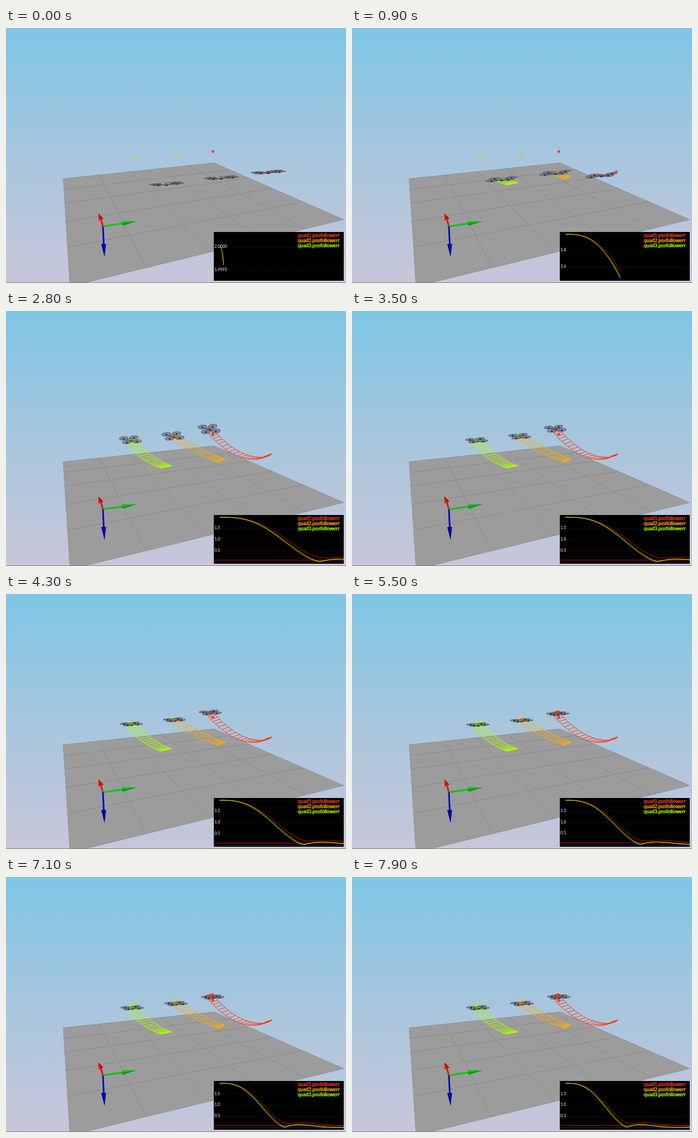
Recreate the animation shown at these times as an HTML page with a canvas. Size 600 by 450 pixels, loop 8 s.

```html
<!DOCTYPE html>
<html lang="en">
<head>
<meta charset="utf-8">
<title>Quadrotor simulation</title>
<style>
html, body { margin: 0; width: 100%; height: 100%; overflow: hidden; }
canvas { display: block; }
</style>
</head>
<body>
<canvas id="stage" width="600" height="450"></canvas>
<script>
const ctx = document.getElementById('stage').getContext('2d');
const LOOP = 8000, STEP = 100;

function trace(pts) {
  ctx.beginPath();
  pts.forEach(p => ctx.lineTo(...p));
}

function line(pts, color, width = 1) {
  trace(pts);
  ctx.strokeStyle = color;
  ctx.lineWidth = width;
  ctx.stroke();
}

function polygon(pts, color) {
  trace(pts);
  ctx.fillStyle = color;
  ctx.fill();
}

function ellipse(x, y, rx, ry, angle, color) {
  ctx.beginPath();
  ctx.ellipse(x, y, rx, ry, angle, 0, 7);
  ctx.fillStyle = color;
  ctx.fill();
}

const mix = (a, b, k) => a + (b - a) * k;

// The simulation runs fast first, then slows down; 1 is the first arrival.
const simTime = t => Math.min(.035 + .497 * t, .8225 + .155 * t);

const quads = [
  { name: 'quad1', color: '#ff3a10', plot: '#d42000', goal: [365, 218], lag: 1.07, drift: 1,
    start: [463, 254], bend: [412, 260], rest: [365, 208.5], rung: [6, -2] },
  { name: 'quad2', color: '#ffb000', plot: '#f0a000', goal: [300, 224], lag: 1.02, drift: .2,
    start: [380, 264], bend: [337, 246], rest: [300, 222.5], rung: [6.5, -3] },
  { name: 'quad3', color: '#a8ff00', plot: '#a8f010', goal: [226, 231], lag: 1, drift: .2,
    start: [283, 275], bend: [245, 259], rest: [222.5, 230], rung: [10, -2] }
];

// Signed distance left along the path: a damped swing from 2 towards 0.
function offset(quad, s) {
  const z = Math.max(0, s / quad.lag) ** 1.4;
  return 2 * Math.cos(Math.PI / 2 * z) * Math.exp(-1.1 * z * z);
}

// Height error, which fades slowly.
const sink = (quad, s) => quad.drift * 2 * s * s * 10 ** -s;

const error = (quad, s) => Math.hypot(offset(quad, s), sink(quad, s));

const progress = (quad, s) => 1 - offset(quad, s) / 2;

function position(quad, s) {
  const p = progress(quad, s), q = 1 - p;
  const [x, y] = [0, 1].map(i =>
    q * q * quad.start[i] + 2 * p * q * quad.bend[i] + p * p * quad.rest[i]);
  return [x, y + 40 * sink(quad, s)];
}

function acceleration(quad, s, h = .02) {
  return (offset(quad, s + h) - 2 * offset(quad, s) + offset(quad, s - h)) / (h * h);
}

const corners = [[101, 266], [367, 238], [596, 338], [113, 456]];

// Perspective map of the unit square onto four corners.
function perspective([a, b, c, d]) {
  const sub = (p, q) => [p[0] - q[0], p[1] - q[1]];
  const cross = (p, q) => p[0] * q[1] - p[1] * q[0];
  const e = sub(b, c), f = sub(d, c), sum = sub(sub(a, b), sub(d, c));
  const g = cross(sum, f) / cross(e, f), h = cross(e, sum) / cross(e, f);
  return (u, v) => [0, 1].map(i =>
    (a[i] + u * (b[i] - a[i] + g * b[i]) + v * (d[i] - a[i] + h * d[i]))
      / (1 + g * u + h * v));
}
const floorPoint = perspective(corners);

function arrow(from, neck, tip, half, color, shade) {
  const dx = tip[0] - neck[0], dy = tip[1] - neck[1], len = Math.hypot(dx, dy);
  const nx = -dy / len * half, ny = dx / len * half;
  line([from, neck], color, 3);
  polygon([[neck[0] + nx, neck[1] + ny], tip, [neck[0] - nx, neck[1] - ny]], color);
  polygon([[neck[0] + nx, neck[1] + ny], tip, neck], shade);
}

function drawScene() {
  const sky = ctx.createLinearGradient(0, 0, 0, 450);
  sky.addColorStop(0, '#7fc6e5');
  sky.addColorStop(.5, '#a7c6dd');
  sky.addColorStop(1, '#c7c6d9');
  ctx.fillStyle = sky;
  ctx.fillRect(0, 0, 600, 450);
  polygon(corners, '#9c9c9d');
  ctx.setLineDash([2, 1]);
  for (let k = 0; k < 1.1; k += .2) {
    line([floorPoint(k, 0), floorPoint(k, 1)], '#7c7c7e', .8);
    line([floorPoint(0, k), floorPoint(1, k)], '#7c7c7e', .8);
  }
  ctx.setLineDash([]);
  line([[0, 449.5], [600, 449.5]], '#85807c');
  const origin = [171, 350];
  arrow(origin, [167.5, 338], [163, 327], 4.5, '#e81408', '#b01408');
  arrow(origin, [205, 345], [231, 341], 4, '#0cc414', '#0a9a10');
  arrow(origin, [172.5, 381], [174, 404], 4.3, '#0c0cbc', '#080888');
}

function drawTrail(quad, s) {
  const left = [], right = [], [wx, wy] = quad.rung;
  for (let u = 0; u <= s; u += .045) {
    const [x, y] = position(quad, u);
    left.push([x - wx, y - wy]);
    right.push([x + wx, y + wy]);
    line([left.at(-1), right.at(-1)], quad.color);
  }
  line(left, quad.color);
  line(right, quad.color);
}

function drawQuad(quad, s) {
  const [x, y] = position(quad, s);
  // Perspective shrinks the frame; speeding up and braking tilt it.
  const px = mix(17, 9.5, progress(quad, s)), py = -.08 * px;
  const qx = 2.8, qy = 1.6 + .55 * acceleration(quad, s);
  const rx = 5 + px / 3, ry = .75 * Math.abs(qy) + .4, angle = Math.atan2(py, px);
  const drawRotor = (a, b) => {
    const cx = x + a * px + b * qx, cy = y + a * py + b * qy;
    line([[x, y + 1], [cx, cy + 1]], '#3a3c48', 1.2);
    ellipse(cx, cy, rx, ry, angle, 'rgba(122,128,146,.85)');
    ctx.strokeStyle = '#3e424c';
    ctx.lineWidth = .7;
    ctx.stroke();
    ellipse(cx, cy + .8, 1.7, 1.3, 0, '#26283a');
  };
  drawRotor(-1, -1);
  drawRotor(1, -1);
  ctx.fillStyle = '#55596c';
  ctx.fillRect(x - 3.5, y - 2, 7, 4);
  ctx.fillStyle = '#2c3090';
  ctx.fillRect(x - 3, y + 1.5, 6, 2);
  drawRotor(-1, 1);
  drawRotor(1, 1);
  line([[x - px * .4, y - py * .4], [x + px * .4, y + py * .4]], quad.color);
}

// Smallest 1-2-5 step that is at least the given size.
function niceStep(size) {
  const unit = 10 ** Math.floor(Math.log10(size));
  return unit * [1, 2, 5, 10].find(m => m * unit >= size);
}

function drawPlot(s) {
  const box = [366.5, 360, 229.5, 86], left = 377, mid = 403, height = 78;
  ctx.save();
  ctx.beginPath();
  ctx.rect(...box);
  ctx.clip();
  ctx.fillStyle = '#000';
  ctx.fillRect(...box);

  const count = 160, times = Array.from({ length: count + 1 }, (_, i) => s * i / count);
  const curves = quads.map(q => times.map(u => error(q, u)));
  const all = curves.flat(), high = Math.max(...all), low = Math.min(...all);
  const scaleX = Math.min(200, 219 / s), scaleY = height / Math.max(.00095, high - low);
  const toY = v => mid - (v - (high + low) / 2) * scaleY;

  const tick = niceStep(18 / scaleY);
  const digits = Math.max(0, Math.ceil(-Math.log10(tick) - 1e-9));
  ctx.font = '7px Lato, sans-serif';
  ctx.textAlign = 'left';
  for (let i = Math.floor(low / tick) - 1; i * tick <= high + tick; i++) {
    const y = toY(i * tick);
    ctx.setLineDash([1, 1]);
    line([[367, y], [596, y]], i ? '#242424' : '#77778c', .8);
    ctx.setLineDash([]);
    if (y < 367 || y > 438) continue;
    ctx.fillStyle = '#fff';
    ctx.fillText((i * tick).toFixed(digits), 368, y + 1);
  }
  line([[367, toY(.1)], [596, toY(.1)]], '#c01028');
  curves.forEach((curve, i) =>
    line(curve.map((v, j) => [left + times[j] * scaleX, toY(v)]), quads[i].plot, .9));

  ctx.font = '8.7px Lato, sans-serif';
  ctx.textAlign = 'right';
  quads.forEach((q, i) => {
    ctx.fillStyle = q.color;
    // Doubled strokes give the legend its heavy look.
    for (const shift of [0, .6]) {
      ctx.fillText(q.name + '.posfollowerr', 588.5 + shift, 369 + i * 9);
    }
  });
  ctx.restore();
}

function frame(now) {
  const s = simTime(Math.floor(now % LOOP / STEP) * STEP / 1000);
  const drawGoal = q => ellipse(...q.goal, 2.2, 2.2, 0, q.color);
  drawScene();
  quads.forEach(drawGoal);
  quads.forEach(q => drawTrail(q, s));
  quads.forEach(q => drawQuad(q, s));
  drawGoal(quads[0]);
  drawPlot(s);
  requestAnimationFrame(frame);
}
requestAnimationFrame(frame);
</script>
</body>
</html>
```
